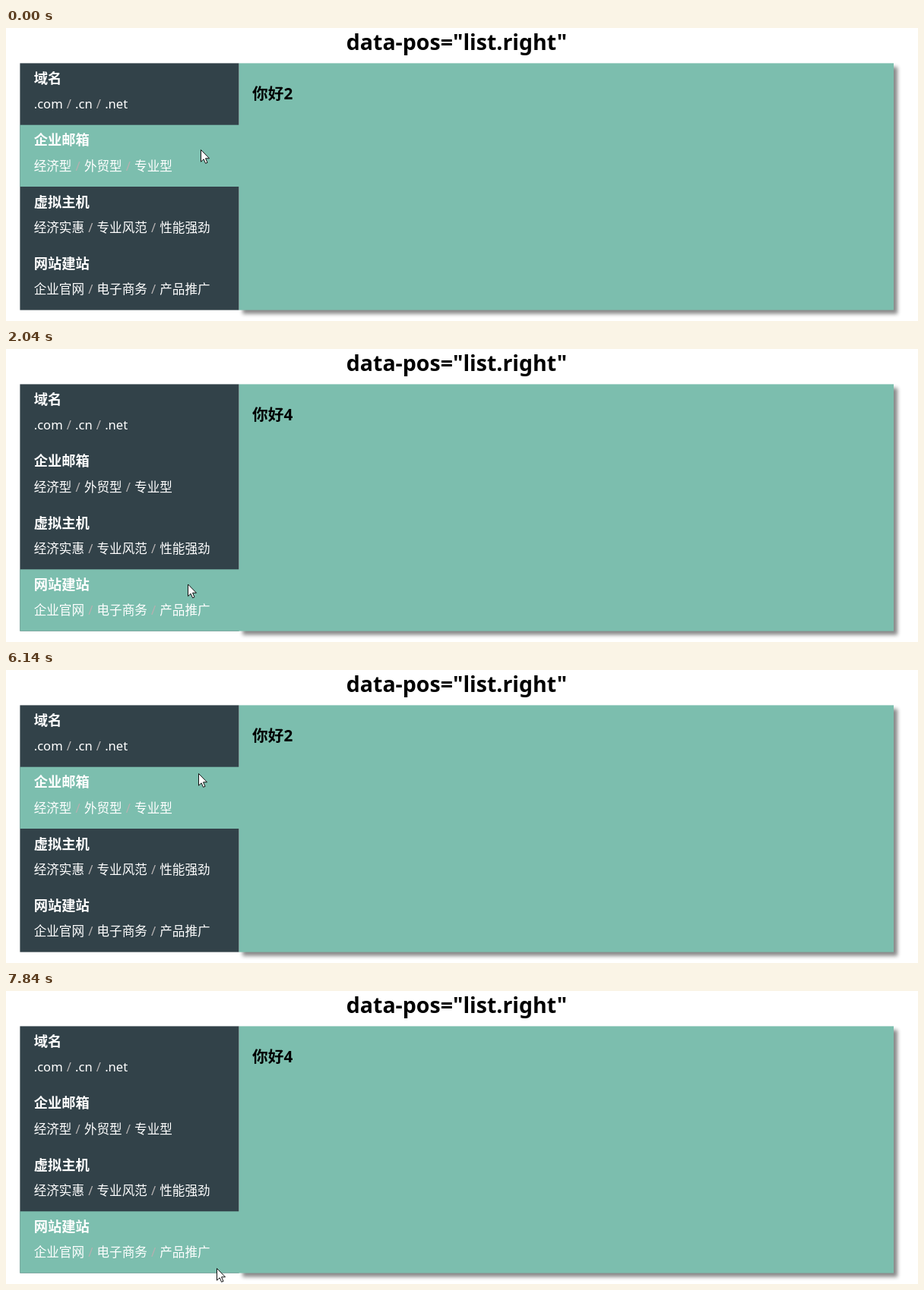
Animation of 1200x386 px, one loop 8 s. Source, as an HTML page:

```html
<!DOCTYPE html>
<html lang="zh-CN">
<head>
<meta charset="utf-8">
<title>data-pos</title>
<style>
  html, body { margin: 0; width: 100%; height: 100%; overflow: hidden; background: #fff; }
  svg { display: block; }
  text { font-family: "Noto Sans", "Noto Sans CJK SC", "Noto Sans CJK", sans-serif; white-space: pre; }
  .title { font-size: 28.5px; font-weight: 700; text-anchor: middle; }
  .head { font-size: 18.3px; font-weight: 700; fill: #fff; }
  .sub { font-size: 16.6px; fill: #fff; }
  .bar { fill: #b4b0b0; }
  .big { font-size: 20.7px; font-weight: 700; }
  .item { font-size: 16.6px; fill: #2e3b3f; }
  .green { fill: #7cbeae; }
  .dark { fill: #324249; }
  .panel { filter: drop-shadow(5.2px 5.2px 2.6px #888); }
</style>
</head>
<body>
<svg id="art" width="1200" height="386" viewBox="0 0 1200 386"></svg>
<script>
const LOOP = 8000, TICK = 341.2;
const LEFT = 18.4, TOP = 46.4, NAV = 288, ROW = 81.3, RIGHT = 1168;
const MENU = [
  ["域名", ".com / .cn / .net"],
  ["企业邮箱", "经济型 / 外贸型 / 专业型"],
  ["虚拟主机", "经济实惠 / 专业风范 / 性能强劲"],
  ["网站建站", "企业官网 / 电子商务 / 产品推广"]
];
// Pointer strokes: first tick, x, then one y per tick; the last y holds.
const STROKES = [
  [0, 256, 160, 167, 173],
  [3, 248, 235, 235, 250],
  [6, 239, 309.5],
  [14, 244, 277],
  [15, 249, 242, 227],
  [17, 253, 167, 136, 94],
  [22, 277, 330, 365]
];

const art = document.getElementById("art");

function add(parent, tag, attrs, text) {
  const el = document.createElementNS("http://www.w3.org/2000/svg", tag);
  for (const key in attrs) el.setAttribute(key, attrs[key]);
  if (text) el.textContent = text;
  return parent.appendChild(el);
}

function label(parent, cls, x, y, text) {
  return add(parent, "text", { class: cls, x, y }, text);
}

function box(cls, x, y, width, height) {
  return add(art, "rect", { class: cls, x, y, width, height });
}

label(art, "title", 593, 29, 'data-pos="list.right"');
box("green panel", LEFT + NAV, TOP, RIGHT - LEFT - NAV, ROW * 4);
box("dark", LEFT, TOP, NAV, ROW * 4);
const mark = box("green", LEFT, TOP, NAV + 0.6, ROW);

MENU.forEach(([name, links], i) => {
  const x = LEFT + 18.3, y = TOP + ROW * i;
  label(art, "head", x, y + 26.5, name);
  const line = label(art, "sub", x, y + 60);
  links.split(/( \/ )/).forEach((part, j) => {
    add(line, "tspan", { class: j % 2 ? "bar" : "link", dx: j ? 0.8 : 0 }, part);
  });
});

const pages = MENU.map((_, i) => {
  const page = add(art, "g", {});
  const columns = i ? 1 : 3;
  for (let col = 0; col < columns; col++) {
    const x = 324 + 272.3 * col;
    label(page, "big", x, 94.2, i ? "你好" + (i + 1) : "产品系列");
    for (let row = 0; row < 3 && !i; row++) label(page, "item", x, 130.2 + 33 * row, "品名");
  }
  return page;
});

const pointer = add(art, "path", {
  d: "M.5 .5V16.2L4.1 12.8L6.6 18.4L9 17.3L6.5 11.8H11.5Z",
  fill: "#fff", stroke: "#111"
});

// Ticks fall on whole hundredths of a second.
const tickTime = n => Math.floor(n * TICK / 10) * 10;

function pointerAt(t) {
  let tick = Math.floor(t / TICK);
  if (tickTime(tick + 1) <= t) tick++;
  const [first, x, ...ys] = STROKES.findLast(s => s[0] <= tick);
  return [x, ys[Math.min(tick - first, ys.length - 1)]];
}

function draw(t) {
  const [x, y] = pointerAt(t);
  const hovered = Math.floor((y - TOP) / ROW);
  mark.setAttribute("y", TOP + ROW * hovered);
  pages.forEach((page, i) => page.setAttribute("visibility", i === hovered ? "visible" : "hidden"));
  pointer.setAttribute("transform", `translate(${x} ${y})`);
}

const start = performance.now();
function frame() {
  draw((performance.now() - start) % LOOP);
  requestAnimationFrame(frame);
}
frame();
</script>
</body>
</html>
```
